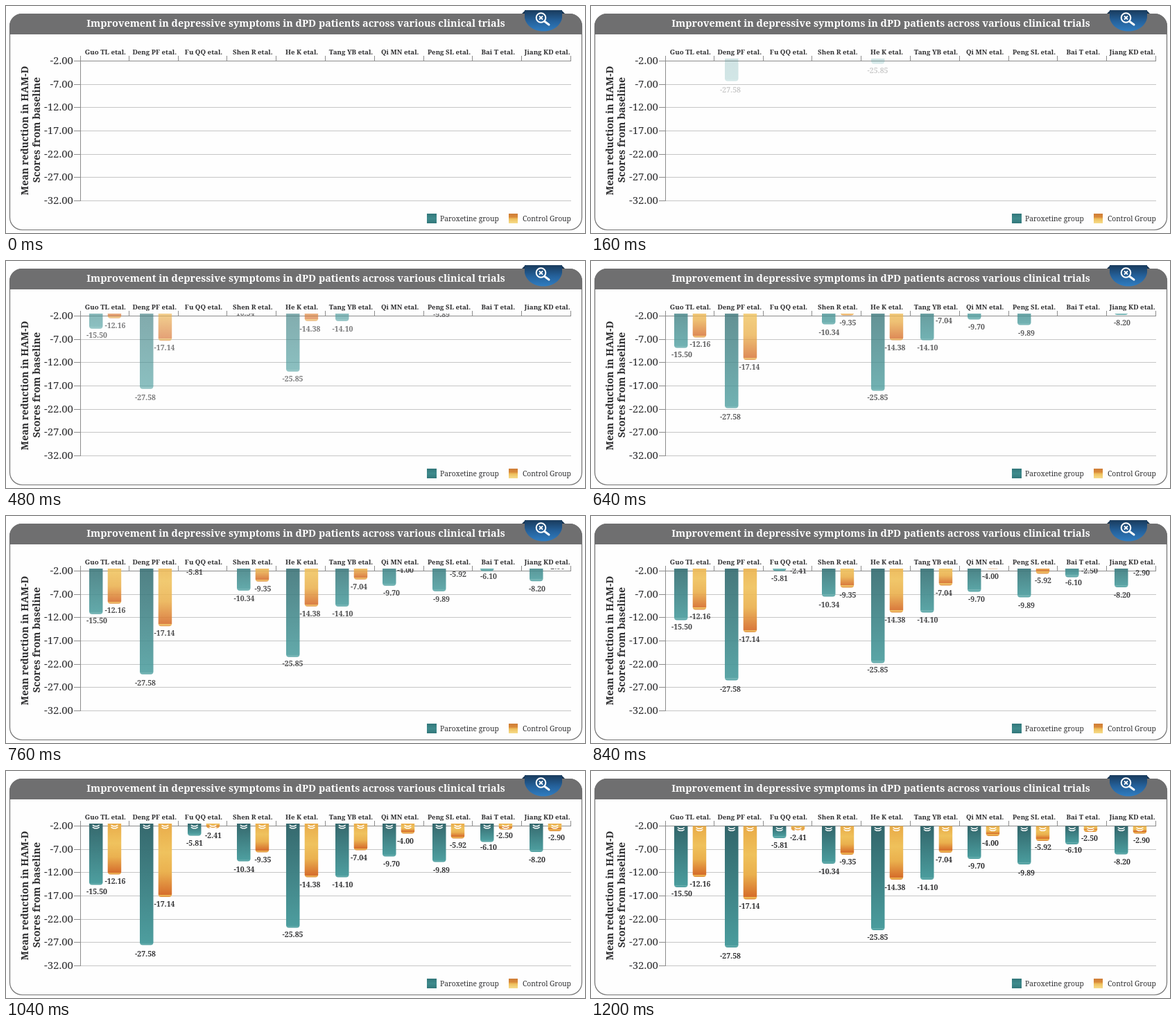
These frames come from a looping animation (835x328 px, 8 s). An HTML page with a canvas:

```html
<!DOCTYPE html>
<html lang="en">
<head>
<meta charset="utf-8">
<title>Depressive symptoms chart</title>
<style>
html, body { margin: 0; width: 100%; height: 100%; overflow: hidden; background: #fff; }
canvas { display: block; }
</style>
</head>
<body>
<canvas id="stage" width="835" height="328"></canvas>
<script>
const ctx = document.getElementById('stage').getContext('2d');
const LOOP = 8000, STEP = 40, RISE = 1200, TRAVEL = 195;
const LEFT = 107, RIGHT = 815, AXIS = 79.5, CLIP = 76, BAR = 19.5, PAIR = 26.7;
const INK = '#2f2f31';

// name, bar x, then for each group: value, bar bottom, label x, label y
const trials = [
  ['Guo TL', 120, ['-15.50', 168, 131, 177.5], ['-12.16', 153, 157.5, 163]],
  ['Deng PF', 193, ['-27.58', 255, 201, 267.5], ['-17.14', 185.5, 228.5, 195.5]],
  ['Fu QQ', 262, ['-5.81', 97, 272, 107.5], ['-2.41', 86, 299, 96.5]],
  ['Shen R', 333, ['-10.34', 134, 343.5, 145.5], ['-9.35', 121, 370.5, 131.5]],
  ['He K', 404, ['-25.85', 230, 413.5, 240], ['-14.38', 157, 438.5, 168]],
  ['Tang YB', 475, ['-14.10', 157, 485.5, 168], ['-7.04', 118, 509, 128.5]],
  ['Qi MN', 543, ['-9.70', 127, 556, 137.5], ['-4.00', 94, 576, 104.5]],
  ['Peng SL', 615, ['-9.89', 135, 628, 147], ['-5.92', 101, 652, 110.5]],
  ['Bai T', 684, ['-6.10', 106, 696, 114], ['-2.50', 88, 719, 97]],
  ['Jiang KD', 755, ['-8.20', 120.5, 766, 131.5], ['-2.90', 90.5, 794, 100]]
];
const TEAL = { body: [[0, '#32666b'], [1, '#4a9c9d']], lip: '#68aeae', rim: '#4a9c9d' };
const GOLD = {
  body: [[0, '#e9ab47'], [0.4, '#efc15b'], [0.68, '#eab04d'], [1, '#d56b29']],
  lip: '#f1c15a', rim: '#dd8a38'
};

function text(str, x, y, size, { bold = true, align = 'center', color = INK } = {}) {
  ctx.font = `${bold ? 'bold ' : ''}${size}px "Noto Serif", serif`;
  ctx.textAlign = align;
  ctx.fillStyle = color;
  ctx.fillText(str, x, y);
}

function line(points, color, width = 1) {
  ctx.beginPath();
  points.forEach(([x, y]) => ctx.lineTo(x, y));
  ctx.strokeStyle = color;
  ctx.lineWidth = width;
  ctx.stroke();
}

function fade(y0, y1, ...stops) {
  const g = ctx.createLinearGradient(0, y0, 0, y1);
  stops.forEach(([at, color]) => g.addColorStop(at, color));
  return g;
}

function shape(fill, points) {
  ctx.beginPath();
  points.forEach(([x, y]) => ctx.lineTo(x, y));
  ctx.closePath();
  ctx.fillStyle = fill;
  ctx.fill();
}

function drawBadge() {
  shape('#14314d', [[744, 11], [749, 6], [749, 11]]);
  shape('#14314d', [[806, 11], [801, 6], [801, 11]]);
  ctx.beginPath();
  ctx.moveTo(748, 6);
  ctx.lineTo(802, 6);
  ctx.lineTo(802, 17);
  ctx.bezierCurveTo(800, 29, 788, 36.5, 775, 36.5);
  ctx.bezierCurveTo(762, 36.5, 750, 29, 748, 17);
  ctx.closePath();
  ctx.fillStyle = fade(6, 36, [0, '#193b5c'], [0.5, '#245f98'], [1, '#2f7cc0']);
  ctx.fill();
  ctx.beginPath();
  ctx.arc(771.5, 17, 6.8, 0, Math.PI * 2);
  ctx.strokeStyle = '#fff';
  ctx.lineWidth = 2;
  ctx.stroke();
  ctx.lineCap = 'round';
  line([[777, 22.5], [783, 27]], '#fff', 3);
  ctx.lineCap = 'butt';
  line([[769, 14.5], [774, 19.5]], '#fff', 1.8);
  line([[774, 14.5], [769, 19.5]], '#fff', 1.8);
}

function drawPanel() {
  ctx.fillStyle = '#fff';
  ctx.fillRect(0, 0, 835, 328);
  ctx.beginPath();
  ctx.roundRect(5.5, 11.5, 825, 312, 18);
  ctx.fillStyle = '#fefefe';
  ctx.fill();
  ctx.strokeStyle = '#727272';
  ctx.lineWidth = 1.2;
  ctx.stroke();
  ctx.beginPath();
  ctx.roundRect(5, 11, 826, 30, [18, 18, 0, 0]);
  ctx.fillStyle = '#6f6f70';
  ctx.fill();
  text('Improvement in depressive symptoms in dPD patients across various clinical trials',
    418, 29.5, 14.38, { color: '#fff' });
  drawBadge();
}

function drawAxes() {
  for (let i = 0; i < 7; i++) {
    const y = Math.round(79 + i * 33.67) + 0.5;
    line([[LEFT, y], [RIGHT, y]], i ? '#c6c6c6' : '#8c8c8c');
    line([[98, y], [LEFT, y]], '#8c8c8c');
    text(`-${2 + i * 5}.00`, 97, y + 4.8, 15, { bold: false, align: 'right' });
  }
  line([[LEFT + 0.5, 72], [LEFT + 0.5, 282]], '#8c8c8c');
  const pitch = (RIGHT - LEFT) / trials.length;
  trials.forEach(([name], i) => {
    const x = Math.round(LEFT + pitch * (i + 1)) - 0.5;
    line([[x, 72], [x, AXIS]], '#8c8c8c');
    text(`${name} etal.`, LEFT + pitch * (i + 0.5) + 1, 69.8, 9.7);
  });
  ctx.save();
  ctx.translate(0, 180);
  ctx.rotate(-Math.PI / 2);
  text('Mean reduction in HAM-D', 0, 32, 14.2);
  text('Scores from baseline', 1, 49, 14.4);
  ctx.restore();
}

function drawLegend() {
  ctx.fillStyle = fade(300, 314, [0, '#32777a'], [0.5, '#3f8b8d'], [1, '#32777a']);
  ctx.fillRect(607, 300, 14, 14);
  ctx.fillStyle = fade(300, 314, [0, '#cf7d38'], [0.35, '#d98a3a'], [0.55, '#efc05c'], [1, '#f6dc8c']);
  ctx.fillRect(725, 300, 13, 14);
  const style = { bold: false, align: 'left' };
  text('Paroxetine group', 626, 310.5, 10.25, style);
  text('Control Group', 745, 310.5, 10.25, style);
}

function drawBar(x, bottom, { body, lip, rim }) {
  const height = bottom - AXIS, edge = 1 - 3 / height;
  ctx.beginPath();
  ctx.roundRect(x, AXIS, BAR, height, [0, 0, 4, 4]);
  const stops = body.map(([at, color]) => [at * edge, color]);
  ctx.fillStyle = fade(AXIS, bottom, ...stops, [edge, lip], [1, rim]);
  ctx.fill();
  const mid = x + BAR / 2;
  for (const y of [81.5, 84.5]) {
    line([[mid - 5, y], [mid - 2, y + 1.7], [mid + 2, y + 1.7], [mid + 5, y]], '#fff', 1.4);
  }
}

function drawBars(time) {
  const left = Math.max(0, 1 - time / RISE) ** 2;
  ctx.save();
  ctx.beginPath();
  ctx.rect(0, CLIP, 835, 252);
  ctx.clip();
  ctx.translate(0, -TRAVEL * left);
  ctx.globalAlpha = 1 - left;
  for (const [, x, drug, control] of trials) {
    drawBar(x, drug[1], TEAL);
    drawBar(x + PAIR, control[1], GOLD);
  }
  for (const [, , ...groups] of trials) {
    for (const [value, , x, y] of groups) text(value, x, y + 3.7, 10.5);
  }
  ctx.restore();
}

function frame(now) {
  const time = Math.floor((now % LOOP) / STEP) * STEP;
  drawPanel();
  drawAxes();
  drawLegend();
  drawBars(time);
}

const start = performance.now();
function tick() {
  frame(performance.now() - start);
  requestAnimationFrame(tick);
}
tick();
</script>
</body>
</html>
```
